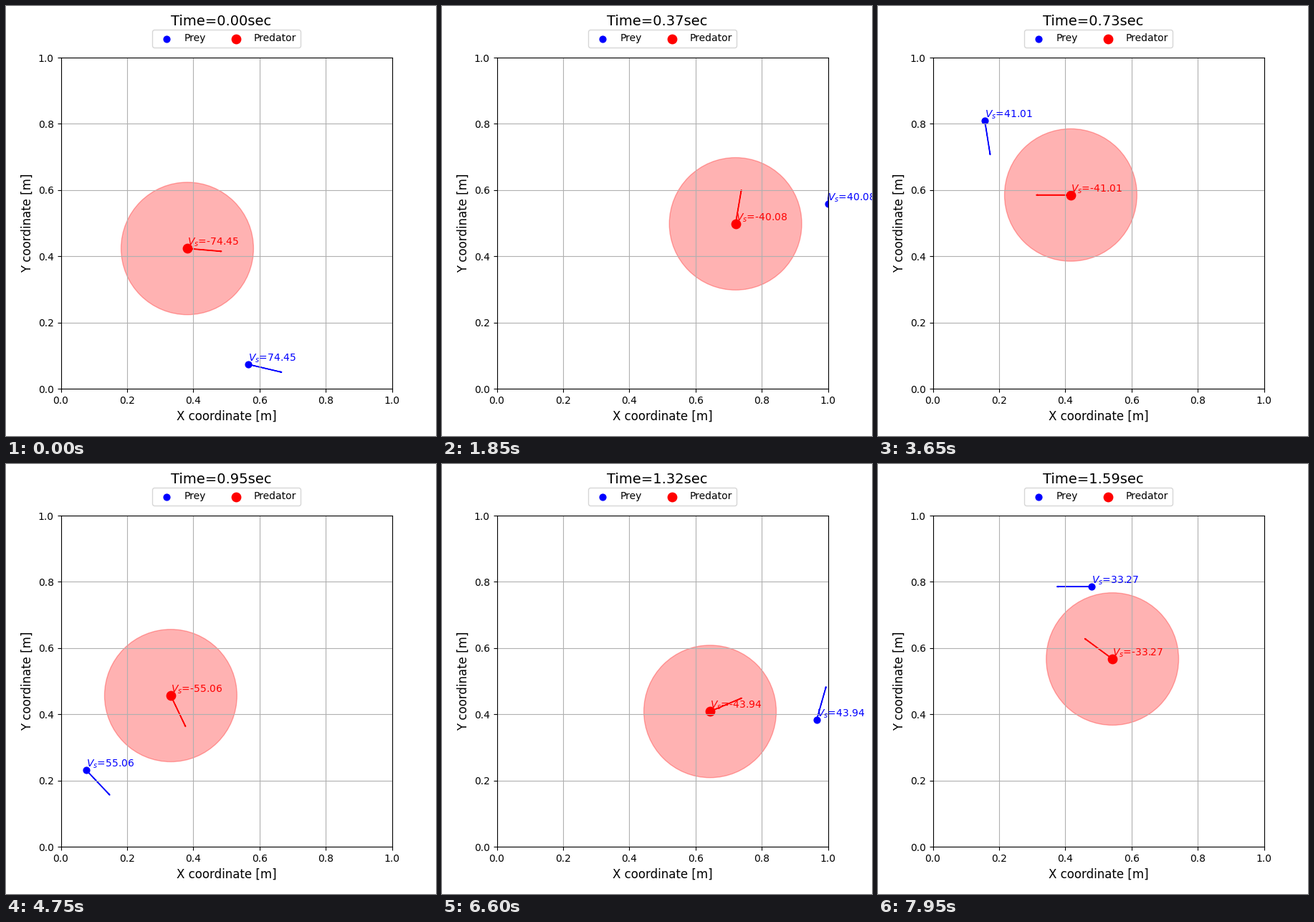
Animation, 600 px wide and 600 px high, one loop 8 s. Source, as a matplotlib script:

```python
import numpy as np
import matplotlib.pyplot as plt
from matplotlib.animation import FuncAnimation

FRAMES, INTERVAL = 160, 50
RANGE = 0.2

# Key poses: step, x, y, heading in degrees
PREY = [
    (0, .566, .0735, -13.2), (17, .991, .212, 45), (37, 1, .558, 85),
    (51, .739, .835, 168), (68, .229, .870, 182), (73, .157, .809, 279),
    (85, .019, .489, 272), (95, .0765, .2315, 313.4), (115, .616, .068, 5),
    (132, .966, .383, 74.2), (159, .479, .7855, 180),
]
PREDATOR = [
    (0, .382, .4235, -4.8), (17, .546, .411, 8), (37, .721, .498, 80.3),
    (51, .627, .568, 165), (73, .4165, .585, 180), (95, .332, .4565, 295.5),
    (115, .4885, .3515, 356), (132, .644, .4085, 22.9), (159, .5425, .567, 143.6),
]
VALUES = {0: 74.45, 37: 40.08, 73: 41.01, 95: 55.06,
          115: 57.93, 132: 43.94, 159: 33.27}


def steer(poses, speed):
    """Position and unit heading per step, passing each pose at a given speed."""
    t, x, y, deg = np.array(poses).T
    pos = x + 1j * y
    vel = speed * np.exp(1j * np.radians(deg))
    steps = np.arange(FRAMES)
    i = np.clip(np.searchsorted(t, steps, side="right") - 1, 0, len(t) - 2)
    h = t[i + 1] - t[i]
    u = (steps - t[i]) / h
    a, b, va, vb = pos[i], pos[i + 1], h * vel[i], h * vel[i + 1]
    path = (a + (b - a) * u * u * (3 - 2 * u)
            + va * u * (1 - u) ** 2 - vb * u * u * (1 - u))
    slope = (6 * (b - a) * u * (1 - u)
             + va * (1 - u) * (1 - 3 * u) + vb * u * (3 * u - 2))
    walled = np.clip(path.real, 0, 1) + 1j * np.clip(path.imag, 0, 1)
    return walled, slope / abs(slope)


class Agent:
    def __init__(self, ax, poses, speed, color, size, label, sign):
        self.path, self.heading = steer(poses, speed)
        self.sign = sign
        self.dot = ax.scatter([0], [0], s=size, color=color, label=label)
        self.arrow = ax.arrow(0, 0, 0.1, 0, color=color)
        self.text = ax.text(0, 0, "", color=color)

    def update(self, step, value):
        p, d = self.path[step], 0.1 * self.heading[step]
        self.dot.set_offsets([(p.real, p.imag)])
        self.arrow.set_data(x=p.real, y=p.imag, dx=d.real, dy=d.imag)
        self.text.set_position((p.real, p.imag + 0.01))
        self.text.set_text(f"$V_s$={self.sign * value:.2f}")
        return p.real, p.imag


fig, ax = plt.subplots(figsize=(6, 6), dpi=100)
ax.set_aspect("equal")
ax.set_xlim(0, 1)
ax.set_ylim(0, 1)
ax.set_xlabel("X coordinate [m]", fontsize=12)
ax.set_ylabel("Y coordinate [m]", fontsize=12)
ax.grid(True)
title = fig.suptitle("Time=0.00sec", fontsize=14)

zone = ax.add_patch(plt.Circle((0, 0), RANGE, color="red", alpha=0.3))
prey = Agent(ax, PREY, 0.0292, "blue", 40, "Prey", 1)
predator = Agent(ax, PREDATOR, 0.0095, "red", 80, "Predator", -1)
ax.legend(loc="upper center", bbox_to_anchor=(0.5, 1.1), ncol=2)


def update(step):
    value = np.interp(step, list(VALUES), list(VALUES.values()))
    prey.update(step, value)
    zone.center = predator.update(step, value)
    title.set_text(f"Time={step / 100:.2f}sec")
    return []


anim = FuncAnimation(fig, update, frames=FRAMES, interval=INTERVAL,
                     init_func=lambda: update(0), repeat=True, repeat_delay=0)
plt.show()
```
